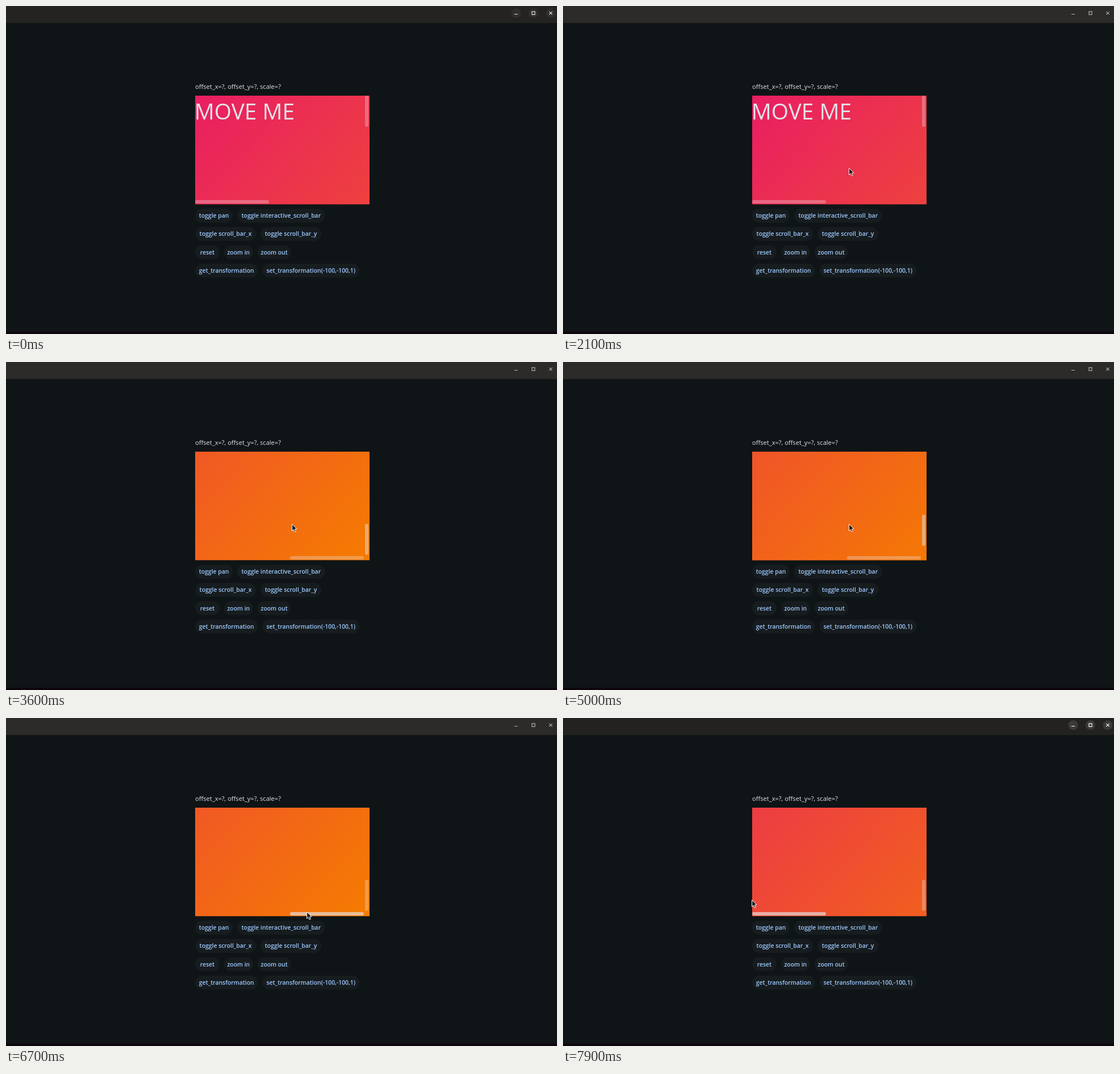
An HTML page that plays this animation: 970x578 px, repeating every 8000 ms.

```html
<!DOCTYPE html>
<html lang="en">
<head>
<meta charset="utf-8">
<title>Interactive viewer</title>
<style>
  html, body { margin: 0; width: 100%; height: 100%; overflow: hidden; background: #0f1416; }
  svg { display: block; width: 970px; height: 578px; }
  text { font-family: "Open Sans", "Noto Sans", sans-serif; fill: #e2e4e8; }
  .btn text { font-size: 10.4px; font-weight: 600; fill: #9ecaff; text-anchor: middle; }
  .btn rect { fill: #171c1f; }
</style>
</head>
<body>
<svg viewBox="0 0 970 578">
  <defs>
    <linearGradient id="fill" gradientUnits="userSpaceOnUse" x1="0" y1="0" x2="700" y2="638">
      <stop offset="0" stop-color="#e91e63"/>
      <stop offset="1" stop-color="#f57c00"/>
    </linearGradient>
    <clipPath id="view"><rect x="333" y="158" width="307" height="191.5"/></clipPath>
  </defs>

  <rect width="970" height="578" fill="#0f1416"/>
  <rect y="574" width="970" height="4" fill="#0d060c"/>
  <rect id="bar" width="970" height="30"/>
  <g id="discs" fill="#3b3a38">
    <circle cx="898" cy="12.5" r="8.5"/>
    <circle cx="928.5" cy="12.5" r="8.5"/>
    <circle cx="959" cy="12.5" r="8.5"/>
  </g>
  <path id="icons" fill="none" stroke-width="1.1"
    d="M895 14.5h6M925.9 9.9h5.2v5.2h-5.2zM956.3 9.8l5.4 5.4M961.7 9.8l-5.4 5.4"/>

  <text x="333" y="146" font-size="11.1">offset_x=?, offset_y=?, scale=?</text>

  <g clip-path="url(#view)">
    <g id="content">
      <rect width="700" height="638" fill="url(#fill)"/>
      <text x="-1.2" y="42" font-size="38.8">MOVE ME</text>
    </g>
    <rect id="thumbX" y="342" width="130" height="6" rx="3" fill="#e2e4e8"/>
    <rect id="thumbY" x="632" width="6" height="55" rx="3" fill="#e2e4e8"/>
  </g>

  <g id="buttons"></g>

  <g id="cursor" stroke="#fff" stroke-linejoin="round" fill="#16191b">
    <path id="arrow" d="M.6 .8V12.6L3.3 10.2L5.2 14.4L7.3 13.4L5.4 9.4L9 9Z"/>
    <path id="hand"
      d="M-1.5 .5Q-1.5 -1 -.3 -1T1 .5V4.5Q2 3.6 3 4.8Q4.2 4 5 5.2Q6.6 4.6 7 6.2V9Q7 11 6 12V13.5H-.5V12L-4 7.8Q-4.4 6.4 -3.2 6.2L-1.5 7.4Z"/>
  </g>
</svg>
<script>
const LOOP = 8000, STEP = 100;
const VIEW = { x: 333, y: 158, w: 307, h: 191.5 };
const CONTENT = { w: 700, h: 638 };
const RANGE = { x: 167, y: 127 };
const $ = id => document.getElementById(id);

// Rows of [label, width], laid out left to right
const ROWS = [
  [["toggle pan", 66], ["toggle interactive_scroll_bar", 155]],
  [["toggle scroll_bar_x", 107], ["toggle scroll_bar_y", 107.5]],
  [["reset", 43], ["zoom in", 51], ["zoom out", 59]],
  [["get_transformation", 110.5], ["set_transformation(-100,-100,1)", 171]]
];
function layout(row, i) {
  const y = 369.5 + i * 32.15;
  let x = VIEW.x;
  return row.map(([label, w]) => {
    const pill = `<g class="btn"><rect x="${x}" y="${y - 12.3}" width="${w}" height="24.6" rx="12.3"/>` +
      `<text x="${x + w / 2}" y="${y + 3.7}">${label}</text></g>`;
    x += w + 7.8;
    return pill;
  }).join("");
}
$("buttons").innerHTML = ROWS.map(layout).join("");
const hoverPill = document.querySelectorAll(".btn rect")[1];

const clamp = (v, max = 1) => Math.max(0, Math.min(max, v));
const ramp = (t, a, b) => clamp((t - a) / (b - a));
const ease = (t, a, b) => { const p = ramp(t, a, b); return p * p * (3 - 2 * p); };
const mix = (a, b, k) => `rgb(${a.map((v, i) => Math.round(v + (b[i] - v) * k))})`;

// Pointer moves: start, end, x, y
const MOVES = [
  [500, 700, 375, 145],
  [800, 1200, 501, 263],
  [1600, 2100, 503, 285],
  [5700, 5900, 528, 364],
  [6200, 6600, 529, 341],
  [7000, 7900, 332, 320]
];
function pointer(t) {
  let x = 83, y = 0;
  for (const [a, b, tx, ty] of MOVES) {
    const p = ease(t, a, b);
    x += (tx - x) * p;
    y += (ty - y) * p;
  }
  const swing = Math.sin(Math.PI * ramp(t, 1600, 2100));
  return [x - 56 * swing, y + 45 * swing];
}

function draw(t) {
  const [px, py] = pointer(t);
  const drag = t > 7000 ? px - 529 : 0;
  const sx = clamp(RANGE.x * ease(t, 2300, 2800) + drag, RANGE.x);
  const sy = 8 * ramp(t, 3100, 3300) + 119 * ramp(t, 3400, 3600)
    - 17 * (ease(t, 3900, 4400) - ease(t, 4900, 5600));
  const ox = sx / RANGE.x * (CONTENT.w - VIEW.w);
  const oy = sy / RANGE.y * (CONTENT.h - VIEW.h);

  $("content").setAttribute("transform", `translate(${VIEW.x - ox} ${VIEW.y - oy})`);
  $("thumbX").setAttribute("x", VIEW.x + sx);
  $("thumbY").setAttribute("y", VIEW.y + sy);
  $("thumbX").setAttribute("opacity", 0.32 + 0.32 * ramp(t, 6400, 6700));
  $("thumbY").setAttribute("opacity", 0.32 + 0.15 * (ramp(t, 3100, 3300) - ramp(t, 5800, 6700)));

  const hover = ramp(t, 5700, 5900) - ramp(t, 6200, 6500);
  hoverPill.style.fill = mix([23, 28, 31], [34, 42, 49], hover);

  const focus = 0.7 * (1 - ramp(t, 0, 200)) + ramp(t, 7000, 7300);
  $("bar").style.fill = mix([44, 43, 41], [35, 34, 32], Math.sqrt(focus));
  $("discs").setAttribute("opacity", focus * focus);
  $("icons").style.stroke = mix([178, 177, 175], [255, 255, 255], focus);

  const overButton = py > 357;
  $("cursor").style.display = t < 500 ? "none" : "";
  $("cursor").setAttribute("transform", `translate(${px} ${py})`);
  $("arrow").style.display = overButton ? "none" : "";
  $("hand").style.display = overButton ? "" : "none";
}

const start = performance.now();
function tick() {
  const t = (performance.now() - start) % LOOP;
  draw(Math.floor(t / STEP) * STEP);
  requestAnimationFrame(tick);
}
tick();
</script>
</body>
</html>
```
